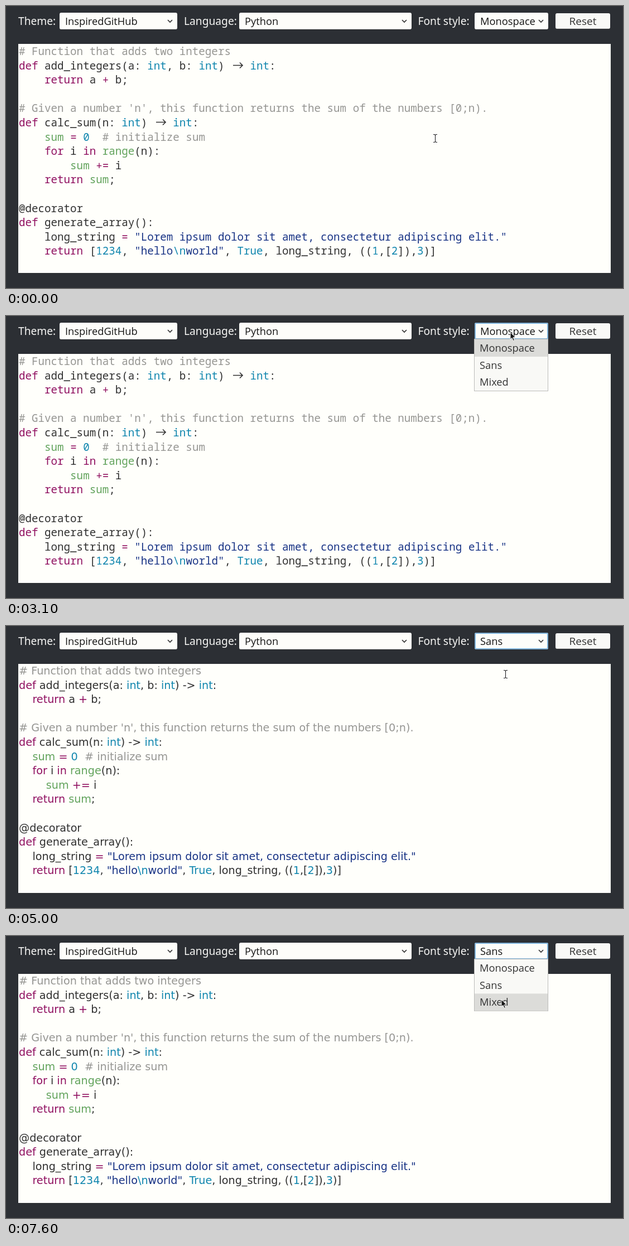
Recreate the animation shown at these times as an HTML page. Size 1106x506 px, loop 8 s.

```html
<!DOCTYPE html>
<html lang="en">
<head>
<meta charset="utf-8">
<title>Code editor font styles</title>
<style>
html, body { margin: 0; width: 100%; height: 100%; overflow: hidden; }
body { position: relative; background: #2c2f34; }
body > *, .box > svg, .popup > *, .stack > *, .cursor > * { position: absolute; }

/* toolbar */
.label { top: 12px; font: 19.2px/30px "Noto Sans", sans-serif; color: #f6f6f4; white-space: pre; }
.box {
  top: 12px; height: 30px; box-sizing: border-box; padding-left: 10px;
  border-radius: 3px; border: solid #d0d0cd; border-width: 0 0 1px;
  background: #fdfdfa; color: #141414;
  font: 18.3px/30px "Open Sans", sans-serif; white-space: pre;
}
.box > svg { right: 7px; top: 11px; width: 12px; height: 8px; }
.reset { top: 13px; height: 28px; padding: 0; line-height: 28px; font-size: 19px; text-align: center; color: #333; background: #f9f9f7; }
.ring { left: 840px; top: 12px; width: 132px; height: 30px; box-sizing: border-box; border: 2px solid #7fb3db; border-radius: 3px; }

/* popup list */
.popup {
  left: 839px; top: 41px; width: 131px; height: 92px;
  border: 1px solid #bcbcba; background: #f9f9f6; color: #333;
  font: 18.3px/30.7px "Open Sans", sans-serif;
}
.popup div { left: 9px; }
.popup .hover { left: 0; top: 0; width: 131px; height: 30.7px; background: #dcdcd9; }

/* editor */
pre {
  left: 22px; top: 68px; width: 1061px; height: 411px; margin: 0; padding-left: 1px;
  background: #fffffb; color: #303030;
  font: 19.2px/25.6px "Noto Sans Mono", monospace;
}
b, i, u, s, em { font-weight: 400; font-style: normal; text-decoration: none; }
b { color: #901060; }
i { color: #1086ae; }
u { color: #62a35c; }
s { color: #969693; }
em { color: #183385; }
.arrow { position: relative; }
.arrow svg { position: absolute; left: 0; top: 0; width: 23px; height: 26px; }
.caret { left: 357px; top: 222px; width: 1px; height: 26px; background: #222; }
svg { overflow: visible; fill: none; }

/* timeline */
pre, .caret, .ring, .popup, .hover, .cursor, .early, .late, .ibeam, .pointer, .plain {
  animation: 8s step-end infinite;
}
pre { animation-name: face; }
.caret { animation-name: caret; }
.ring { animation-name: ring; }
.popup { animation-name: popup; }
.hover { animation-name: hover; }
.early { animation-name: early; }
.late { animation-name: late; }
.plain { animation-name: plain; }
.cursor { left: 0; top: 0; animation-name: path; }
.ibeam { animation-name: ibeam; }
.pointer { animation-name: pointer; }

@keyframes face {
  0% { font-family: "Noto Sans Mono", monospace; }
  62.5%, 100% { font-family: "DejaVu Sans", sans-serif; }
}
@keyframes early { 0% { opacity: 1; } 62.5%, 100% { opacity: 0; } }
@keyframes late { 0% { opacity: 0; } 62.5%, 100% { opacity: 1; } }
@keyframes plain { 0% { color: transparent; } 62.5%, 100% { color: #303030; } }
@keyframes caret { 0%, 38.75%, 100% { opacity: 0; } 12.5% { opacity: 1; } }
@keyframes ring { 0% { opacity: 0; } 38.75%, 100% { opacity: 1; } }
@keyframes popup { 0%, 56.25% { opacity: 0; } 38.75%, 80%, 100% { opacity: 1; } }
@keyframes hover {
  0%, 91.25% { transform: none; }
  42.5%, 92.5% { transform: translateY(30.7px); }
  95%, 100% { transform: translateY(61.4px); }
}
@keyframes ibeam { 0%, 62.5% { opacity: 1; } 25%, 72.5%, 100% { opacity: 0; } }
@keyframes pointer { 0%, 62.5% { opacity: 0; } 25%, 72.5%, 100% { opacity: 1; } }
@keyframes path {
  0% { transform: translate(769px, 237px); }
  3.75% { transform: translate(728px, 239px); }
  5% { transform: translate(638px, 240px); }
  6.25% { transform: translate(565px, 237px); }
  7.5% { transform: translate(542px, 235px); }
  20% { transform: translate(556px, 228px); }
  21.25% { transform: translate(625px, 195px); }
  22.5% { transform: translate(734px, 143px); }
  23.75% { transform: translate(840px, 86px); }
  25% { transform: translate(924px, 36px); }
  26.25% { transform: translate(951px, 14px); }
  27.5% { transform: translate(925px, 22px); }
  28.75% { transform: translate(904px, 29px); }
  41.25% { transform: translate(903px, 45px); }
  42.5% { transform: translate(900px, 78px); }
  43.75% { transform: translate(897px, 97px); }
  47.5% { transform: translate(897px, 95px); }
  48.75% { transform: translate(896px, 91px); }
  50% { transform: translate(895px, 88px); }
  51.25% { transform: translate(895px, 86px); }
  72.5% { transform: translate(895px, 56px); }
  73.75% { transform: translate(894px, 39px); }
  77.5% { transform: translate(896px, 38px); }
  91.25% { transform: translate(895px, 49px); }
  92.5% { transform: translate(892px, 78px); }
  93.75% { transform: translate(889px, 101px); }
  95%, 100% { transform: translate(888px, 114px); }
}
</style>
</head>
<body>
<svg width="0" height="0">
  <defs>
    <path id="chevron" d="M2 2L6 6L10 2" stroke="#333" stroke-width="1.7"/>
    <path id="ligature" d="M4 13.5H21M16 8.5L21 13.5L16 18.5" stroke="#303030" stroke-width="1.6"/>
    <path id="beam" d="M-3 -6.5H-1L.5 -5.5L2 -6.5H4M.5 -5.5V6.5M-3 7.5H-1L.5 6.5L2 7.5H4"/>
  </defs>
</svg>

<div class="label" style="left:22px">Theme:</div>
<div class="box" style="left:96px;width:211px">InspiredGitHub<svg><use href="#chevron"/></svg></div>
<div class="label" style="left:319px">Language:</div>
<div class="box" style="left:418px;width:309px">Python<svg><use href="#chevron"/></svg></div>
<div class="label" style="left:738.5px">Font style:</div>
<div class="box stack" style="left:840px;width:132px"><span class="early">Monospace</span><span class="late">Sans</span><svg><use href="#chevron"/></svg></div>
<div class="ring"></div>
<div class="box reset" style="left:985px;width:98px">Reset</div>

<pre><s># Function that adds two integers</s>
<b>def</b> add_integers(a: <i>int</i>, b: <i>int</i>) <span class="arrow"><span class="plain">-&gt;</span><svg class="early"><use href="#ligature"/></svg></span> <i>int</i>:
    <b>return</b> a <b>+</b> b;

<s># Given a number 'n', this function returns the sum of the numbers [0;n).</s>
<b>def</b> calc_sum(n: <i>int</i>) <span class="arrow"><span class="plain">-&gt;</span><svg class="early"><use href="#ligature"/></svg></span> <i>int</i>:
    <u>sum</u> <b>=</b> <i>0</i>  <s># initialize sum</s>
    <b>for</b> i <b>in</b> <u>range</u>(n):
        <u>sum</u> <b>+=</b> i
    <b>return</b> <u>sum</u>;

@decorator
<b>def</b> generate_array():
    long_string <b>=</b> <em>"Lorem ipsum dolor sit amet, consectetur adipiscing elit."</em>
    <b>return</b> [<i>1234</i>, <em>"hello<i>\n</i>world"</em>, <i>True</i>, long_string, ((<i>1</i>,[<i>2</i>]),<i>3</i>)]</pre>
<div class="caret"></div>

<div class="popup">
  <span class="hover"></span>
  <div style="top:0">Monospace</div>
  <div style="top:30.7px">Sans</div>
  <div style="top:61.4px">Mixed</div>
</div>

<div class="cursor">
  <svg class="ibeam" width="1" height="1">
    <use href="#beam" stroke="#fff" stroke-width="2.6"/>
    <use href="#beam" stroke="#222" stroke-width="1.1"/>
  </svg>
  <svg class="pointer" width="1" height="1">
    <path d="M0 0V13L3 10.3L5.2 15.5L7.4 14.5L5.2 9.4H9.2Z" fill="#151515" stroke="#fff" stroke-width="1"/>
  </svg>
</div>
</body>
</html>
```
